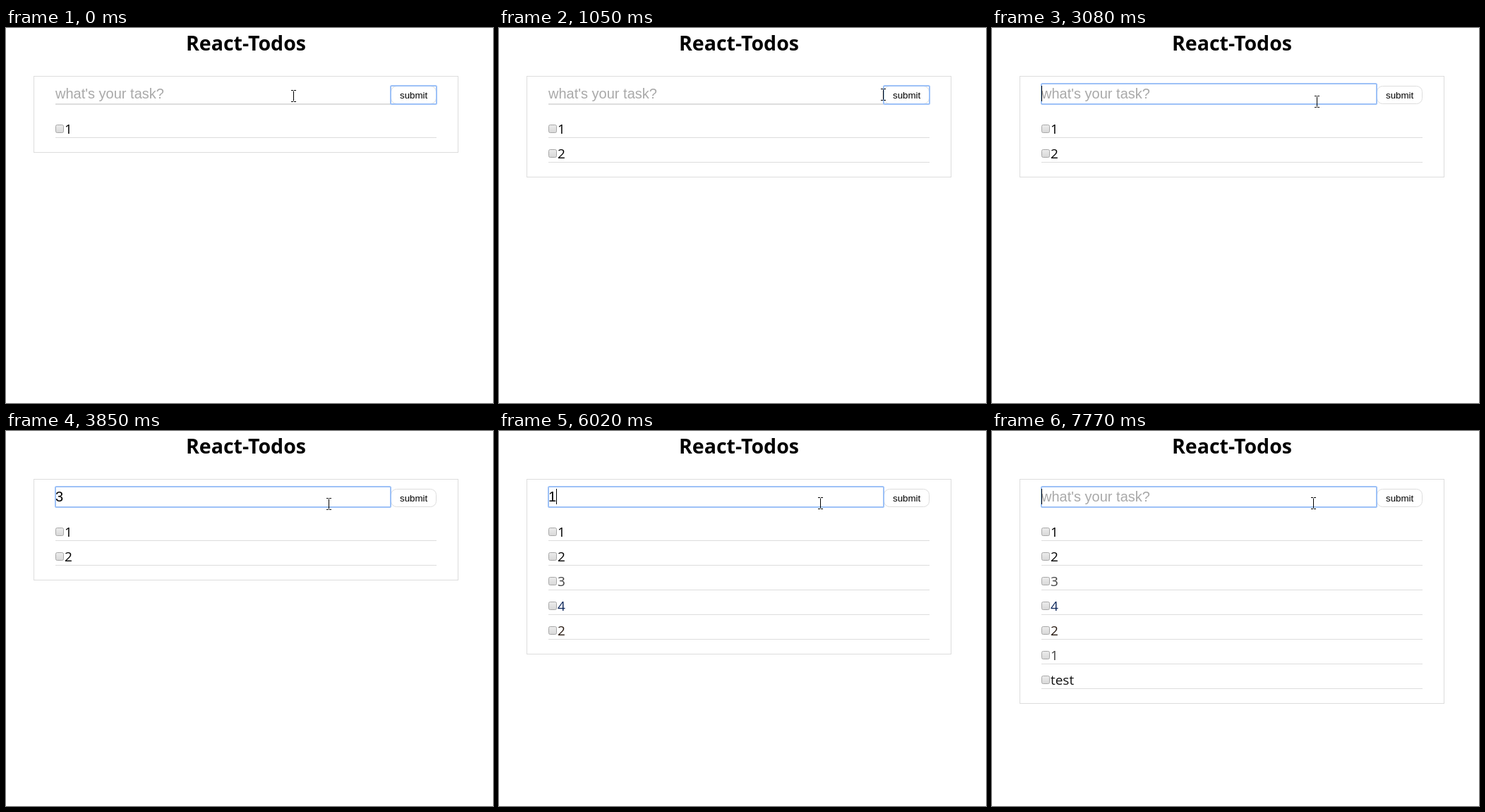
Recreate the animation shown at these times as an HTML page. Size 690 by 532 pixels, loop 8000 ms.

```html
<!DOCTYPE html>
<html lang="en">
<head>
<meta charset="utf-8">
<title>React-Todos</title>
<style>
  html, body { margin: 0; width: 100%; height: 100%; overflow: hidden; background: #fff; }
  svg { display: block; }
  .title { font: bold 28.5px "Open Sans", "Noto Sans", sans-serif; text-anchor: middle; }
  .item { font: 19px "Open Sans", "Noto Sans", sans-serif; }
  .field { font: 20px "Liberation Sans", Arial, sans-serif; }
  .button { font: 13.333px "Liberation Sans", Arial, sans-serif; }
  .line { fill: none; stroke: #ddd; }
  .ring { fill: none; stroke: #9dc1f7; stroke-width: 2; }
  .check { fill: url(#shade); stroke: #a8a8a8; }
</style>
</head>
<body>
<svg width="690" height="532" viewBox="0 0 690 532">
  <defs>
    <linearGradient id="shade" x2="0" y2="1">
      <stop stop-color="#ececec"/><stop offset="1" stop-color="#d8d8d8"/>
    </linearGradient>
  </defs>
  <text class="title" x="340" y="32">React-Todos</text>
  <g id="scene"></g>
</svg>
<script>
const LOOP = 8000, STEP = 70;
const scene = document.getElementById('scene');
const colors = ['#000', '#000', '#444', '#10295c', '#2a1c14', '#444', '#111'];

// Pointer path: time, x, y
const path = [
  [0, 407, 96], [350, 470, 79], [560, 520, 82], [700, 520, 82], [840, 560, 92],
  [910, 556, 94], [1050, 544, 94], [1610, 544, 94], [1680, 558, 92], [1750, 568, 91],
  [1820, 568, 91], [2170, 449, 109], [2310, 432, 110], [2590, 432, 110],
  [3220, 468, 102], [3290, 468, 102], [3430, 464, 102], [3640, 464, 102],
  [3850, 457, 103], [3990, 457, 103], [4130, 455, 102]
];

// Input actions: time, action, typed text
const actions = [
  [140, 'focus'], [420, 'type', '2'], [840, 'press'], [910, 'add'],
  [2310, 'blur'], [2940, 'focus'],
  [3360, 'type', '3'], [3850, 'hide'], [3920, 'add'], [4340, 'hide'],
  [4690, 'type', '4'], [4970, 'add'], [5390, 'type', '2'], [5670, 'add'],
  [6020, 'type', '1'], [6300, 'add'], [6790, 'hide'],
  [7000, 'type', 't'], [7210, 'type', 'e'], [7280, 'type', 's'], [7420, 'type', 't'],
  [7770, 'add']
];

function stateAt(t) {
  const s = { items: ['1'], value: '', focus: 'button', caret: true };
  for (const [time, action, key] of actions) {
    if (time > t) break;
    s.caret = action !== 'hide';
    if (action === 'focus') s.focus = 'field';
    if (action === 'press') s.focus = 'button';
    if (action === 'blur') s.focus = '';
    if (action === 'type') s.value += key;
    if (action === 'add') {
      s.items.push(s.value);
      s.value = '';
    }
  }
  return s;
}

function pointerAt(t) {
  const i = path.findIndex(p => p[0] > t);
  if (i < 0) return path[path.length - 1].slice(1);
  const [t0, x0, y0] = path[i - 1], [t1, x1, y1] = path[i];
  const k = (t - t0) / (t1 - t0);
  return [Math.round(x0 + (x1 - x0) * k), Math.round(y0 + (y1 - y0) * k)];
}

const rect = (cls, x, y, w, h, r = 0) =>
  `<rect class="${cls}" x="${x}" y="${y}" width="${w}" height="${h}" rx="${r}"/>`;
const text = (cls, x, y, str, fill = '#000') =>
  `<text class="${cls}" x="${x}" y="${y}" fill="${fill}">${str}</text>`;

function pointer([x, y]) {
  const beam = x < 545 && y >= 79 && y < 108;
  const shape = beam
    ? 'M-3 -8H0M1 -8H4M.5 -7V7M-3 8H0M1 8H4'
    : 'M0 0V16L3.8 12.5L6.4 18.3L8.5 17.4L6 11.6H11Z';
  return `<path d="${shape}" transform="translate(${x + (beam ? 0 : .5)} ${y + .5})"
    fill="${beam ? 'none' : '#fff'}" stroke="#000"/>`;
}

function caret(value) {
  const width = [...value].reduce((w, c) => w + ({ t: 5.56, s: 10 }[c] || 11.12), 0);
  return `<rect x="${70 + Math.round(width)}" y="82" width="1" height="22"/>`;
}

function draw(t) {
  const s = stateAt(t);
  let out = rect('line', 39.5, 68.5, 601, 73 + 35 * s.items.length);
  out += '<path d="M70 108H545" stroke="#ddd" stroke-width="2"/>';
  out += rect('line', 545.5, 82.5, 64, 25, 8);
  if (s.focus === 'button') out += rect('ring', 545, 82, 65, 26, 1.5);
  if (s.focus === 'field') out += rect('ring', 70, 79, 475, 29, 1.5);
  out += s.value ? text('field', 70, 100, s.value)
                 : text('field', 70, 100, "what's your task?", '#a9a9a9');
  if (s.focus === 'field' && s.caret) out += caret(s.value);
  out += text('button', 558, 100, 'submit');
  s.items.forEach((item, i) => {
    const y = 35 * i;
    out += rect('check', 70.5, 137.5 + y, 11, 11, 2);
    out += text('item', 83, 150 + y, item, colors[i]);
    out += `<path class="line" d="M70 ${155.5 + y}H610"/>`;
  });
  scene.innerHTML = out + pointer(pointerAt(t));
}

const start = performance.now();
let last = -1;
function tick() {
  const t = Math.floor((performance.now() - start) % LOOP / STEP) * STEP;
  if (t !== last) draw(last = t);
  requestAnimationFrame(tick);
}
tick();
</script>
</body>
</html>
```
